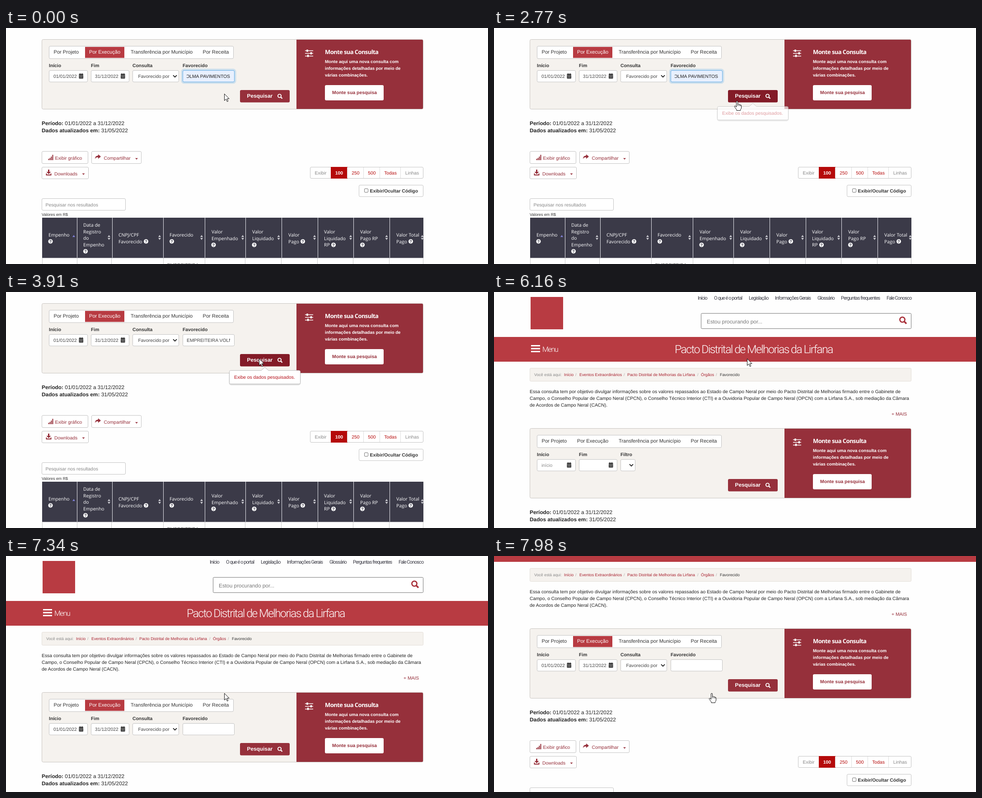
These frames come from a looping animation (1067 by 525 pixels, 8 s). An HTML page:

```html
<!DOCTYPE html>
<html lang="pt-BR">
<head>
<meta charset="utf-8">
<title>Consulta</title>
<style>
html, body { margin: 0; width: 100%; height: 100%; overflow: hidden; background: #fefefe; }
svg { display: block; width: 1067px; height: 525px; }
text { font-family: "Liberation Sans", Arial, sans-serif; white-space: pre; text-rendering: geometricPrecision; }
.b { font-weight: 700; }
.head { font-family: "Open Sans", sans-serif; }
.bold { font-family: "Open Sans", sans-serif; font-weight: 700; letter-spacing: -.6px; }
.nav { font-family: Roboto, sans-serif; letter-spacing: -.95px; }
.title { font-family: Roboto, sans-serif; font-weight: 300; letter-spacing: -1.7px; }
.menu { font-family: Roboto, sans-serif; font-weight: 300; letter-spacing: -1.3px; }
</style>
</head>
<body>
<svg id="stage" viewBox="0 0 1067 525"></svg>
<script>
const RED = '#96303b', BAND = '#b83b42', INK = '#333', GRAY = '#888', CREAM = '#f5f2ee', DARK = '#3b3a48';
const BASE = 10.37;

const text = (x, y, s, fill = INK, size = BASE, cls = '', more = '') =>
  `<text x="${x}" y="${y}" fill="${fill}" font-size="${size}" class="${cls}" ${more}>${s}</text>`;
const rect = (x, y, w, h, fill, stroke = 'none', r = 0, more = '') =>
  `<rect x="${x}" y="${y}" width="${w}" height="${h}" fill="${fill}" stroke="${stroke}" rx="${r}" ${more}/>`;
const box = (x, y, w, h) => rect(x + .5, y + .5, w - 1, h - 1, '#fff', '#c4c4c4', 2.5);
const path = (d, fill, stroke = 'none', width = 1) =>
  `<path d="${d}" fill="${fill}" stroke="${stroke}" stroke-width="${width}"/>`;
const group = (id, s) => `<g id="${id}">${s}</g>`;

const lens = (x, y, color, k = 1) => `<g transform="translate(${x} ${y}) scale(${k})" fill="none" stroke="${color}">
  <circle cx="-1" cy="-1" r="3.7" stroke-width="1.8"/><path d="M2 2L5 5" stroke-width="2.4"/></g>`;
const calendar = x => rect(x, 380, 9.5, 10.5, '#222', 'none', 1) +
  path(`M${x} 382.8h9.5M${x + 1} 385.5h7.5M${x + 1} 388h7.5`, 'none', '#fff', .7) +
  path(`M${x + 2.5} 379v2.5m4.5-2.5v2.5`, 'none', '#222', 1.4);
const chevron = x => path(`M${x - 4} 383.2l4 4 4-4`, 'none', '#222', 1.9);
const caretDown = (x, y) => path(`M${x - 3} ${y}h6l-3 3.2z`, RED);

function header() {
  const nav = [[451, 'Início'], [487, 'O que é o portal'], [564, 'Legislação'], [622, 'Informações Gerais'],
    [716, 'Glossário'], [768, 'Perguntas frequentes'], [869, 'Fale Conosco']];
  const crumbs = [[89, 'Você está aqui:', GRAY], [155, 'Início', '#a8202e'], [180, '/', '#aaa'],
    [189, 'Eventos Extraordinários', '#a8202e'], [287, '/', '#aaa'],
    [295, 'Pacto Distrital de Melhorias da Lirfana', '#a8202e'], [450, '/', '#aaa'],
    [458, 'Órgãos', '#a8202e'], [491, '/', '#aaa'], [500, 'Favorecido', INK]];
  const intro = [
    'Essa consulta tem por objetivo divulgar informações sobre os valores repassados ao Estado de Campo Neral por meio do Pacto Distrital de Melhorias firmado entre o Gabinete de',
    'Campo, o Conselho Popular de Campo Neral (CPCN), o Conselho Técnico Interior (CTI) e a Ouvidoria Popular de Campo Neral (OPCN) com a Lirfana S.A., sob mediação da Câmara',
    'de Acordos de Campo Neral (CACN).'];
  return rect(81, 11, 72, 72, BAND) +
    nav.map(([x, s]) => text(x, 17, s, '#3a3a44', 11, 'nav')).join('') +
    rect(458.5, 47.5, 465, 34, '#fff', '#777', 2) +
    text(471, 69.5, 'Estou procurando por...', '#777', 11.85) + lens(905.5, 63, '#a8303a', 1.5) +
    rect(0, 100, 1067, 55, BAND) +
    path('M82 119.5h20m-20 6.5h20m-20 6.5h20', 'none', '#fff', 3) +
    text(107, 132.5, 'Menu', '#fff', 16, 'menu') +
    text(400, 136, 'Pacto Distrital de Melhorias da Lirfana', '#fff', 25, 'title') +
    rect(79.5, 169.5, 844, 29, CREAM, '#e3ded8', 2) +
    crumbs.map(([x, s, c]) => text(x, 187, s, c, 8.89)).join('') +
    intro.map((s, i) => text(79, 225 + 15 * i, s, '#222')).join('') +
    text(880, 275, '+ MAIS', RED);
}

function form() {
  const company = 'EMPREITEIRA VOLMA PAVIMENTOS';
  const label = (x, s) => text(x, 364.7, s, INK, BASE, 'b');
  const tab = (x, s) => text(x, 335.2, s, INK, 11.11);
  const empty = tab(184, 'Por Execução') + label(280, 'Filtro') +
    text(105, 389, 'início', GRAY) + box(280, 372, 33, 26.5) + chevron(304);
  const filled = rect(175, 320, 87, 24.5, BAND) + text(184, 335.2, 'Por Execução', '#fff', 11.11) +
    label(280, 'Consulta') + label(391, 'Favorecido') +
    text(105, 389, '01/01/2022', '#444') + text(197, 389, '31/12/2022', '#444') +
    box(280, 372, 103, 26.5) + text(292.5, 389, 'Favorecido por', '#444') + chevron(374) +
    box(391, 372, 115, 26.5);
  const focus = rect(390, 371, 117, 28.5, 'none', '#66afe9', 4, 'stroke-width="5" opacity=".28"') +
    rect(391.5, 372.5, 114, 25.5, '#e8f0fe', '#66afe9', 2.5) +
    text(496, 389, company, '#222', BASE, '', 'text-anchor="end" clip-path="url(#field)"') +
    group('caret', rect(494, 380, 1, 11, '#111'));
  return rect(79.5, 303.5, 844, 155, CREAM, '#c9c5c1', 3) +
    path('M643 304h278q2 0 2 2v150q0 2-2 2h-278z', RED) +
    box(95, 318, 409, 28.5) + tab(105.5, 'Por Projeto') + tab(276, 'Transferência por Município') + tab(435.5, 'Por Receita') +
    label(95, 'Início') + label(188, 'Fim') + box(95, 372, 86, 26.5) + box(188, 372, 85, 26.5) +
    calendar(161.5) + calendar(254) +
    group('empty', empty) + group('filled', filled) +
    group('typed', text(400, 389, company, '#444', BASE, '', 'clip-path="url(#field)"')) + group('focus', focus) +
    rect(518, 416, 110, 27.5, RED, 'none', 3, 'id="button"') +
    text(533.5, 433.3, 'Pesquisar', '#fff', 11.85, 'b') + lens(606.5, 430, '#fff') +
    path('M662 328.5h18m-18 6h18m-18 6h18', 'none', '#fff', 1.7) +
    path('M667 326v5m8.5 .8v5m-7 .8v5', 'none', '#fff', 3.4) +
    text(706, 335.7, 'Monte sua Consulta', '#fff', 13, 'bold') +
    ['Monte aqui uma nova consulta com', 'informações detalhadas por meio de', 'várias combinações.']
      .map((s, i) => text(706, 356.3 + 15 * i, s, '#fff', 9.63, 'b')).join('') +
    rect(706, 405, 130, 34, '#fff', 'none', 3) + text(722, 425.2, 'Monte sua pesquisa', RED, BASE, 'b');
}

function results() {
  const pair = (y, a, b) => `<text x="79" y="${y}" font-size="11.85" fill="#222"><tspan class="b">${a}</tspan> ${b}</text>`;
  const pager = [[674, 45, 'Exibir', GRAY], [719, 37, '100', '#fff'], [756, 36, '250', '#b50a0a'],
    [792, 36, '500', '#b50a0a'], [828, 46, 'Todas', '#b50a0a'], [874, 50, 'Linhas', GRAY]];
  return pair(493.5, 'Período:', '01/01/2022 a 31/12/2022') + pair(510.3, 'Dados atualizados em:', '31/05/2022') +
    box(79, 552, 103, 28) + path('M94.5 572v-3m3 3v-5m3 5v-8m3 8v-12', 'none', RED, 2) + text(108.5, 570.7, 'Exibir gráfico', RED) +
    box(189, 552, 111, 28) + path('M197 570c0-6 3-8 7-8v-3l6 5-6 5v-3.5c-4 0-6 1-7 4.5z', RED) +
    text(216.5, 570.7, 'Compartilhar', RED) + caretDown(289, 567.5) +
    box(79, 587, 104, 27) + path('M93 593h3v5h3.5l-5 5-5-5h3.5zM88.5 601.5h2v2.5h8v-2.5h2v4.5h-12z', RED) +
    text(107, 605.7, 'Downloads', RED) + caretDown(171.5, 601.5) +
    box(673, 587, 251, 26) +
    pager.map(([x, w, s, c], i) => (i > 1 ? path(`M${x - .5} 588v24`, 'none', '#ddd') : '') +
      (i == 1 ? rect(x, 587, w, 26, '#b50a0a') : '') +
      text(x + w / 2, 603.8, s, c, BASE, i == 1 ? 'b' : '', 'text-anchor="middle"')).join('') +
    box(781, 627, 143, 26.5) + rect(793.5, 635.5, 8, 8, '#fff', '#777', 1.5) +
    text(805.5, 644, 'Exibir/Ocultar Código', INK, BASE, 'b') +
    box(79, 657, 186, 27) + text(87.5, 674.5, 'Pesquisar nos resultados', GRAY) +
    text(79, 696.3, 'Valores em R$', INK, 8.89);
}

function table() {
  // x, vertical centre of the first line, lines, help icon offset, sort arrow x
  const cols = [
    [94, 738, ['Empenho', ''], 4.5, 150], [171, 716, ['Data de', 'Registro', 'do', 'Empenho', ''], 5, 228],
    [249, 738, ['CNPJ/CPF', 'Favorecido'], 61, 340], [362, 738, ['Favorecido', ''], 5, 433],
    [455, 731, ['Valor', 'Empenhado', ''], 4.5, 524], [545, 731, ['Valor', 'Liquidado', ''], 4.5, 603.5],
    [625, 738, ['Valor', 'Pago'], 32, 683], [704, 731, ['Valor', 'Liquidado', 'RP'], 21, 763],
    [784, 731, ['Valor', 'Pago RP', ''], 5, 842.5], [864, 738, ['Valor Total', 'Pago'], 32, 921.5]];
  const edges = [157.5, 235.5, 348.5, 440.5, 530.5, 610.5, 690.5, 769.5, 849.5];
  return rect(80, 700, 844, 89.5, DARK) +
    edges.map((x, i) => path(`M${x} 700v89`, 'none', '#e8e8ee') +
      path(`M${x - (i == 1 ? 2 : i > 3 ? 1 : 0)} 790v20`, 'none', '#ccc')).join('') +
    path('M80.5 790v20m843-20v20', 'none', '#ccc') +
    cols.map(([x, y, lines, dx, sx], i) => {
      const end = y + 14.7 * (lines.length - 1);
      return lines.map((s, n) => text(x, y + 3.8 + 14.7 * n, s, '#fff', BASE, 'head')).join('') +
        `<circle cx="${x + dx}" cy="${end}" r="5" fill="#fff"/>` +
        text(x + dx, end + 3.2, '?', DARK, 9, 'b', 'text-anchor="middle"') +
        (i ? path(`M${sx - 3} 743l3-4.5 3 4.5zm0 2h6l-3 4.5z`, '#c9c9cf')
           : path(`M${sx - 3} 743l3-4.5 3 4.5z`, '#7f7fd5'));
    }).join('') +
    text(356.5, 809, 'EMPREITEIRA', '#444');
}

const tooltip = rect(493.5, 454, 159, 31.5, '#000', 'none', 5, 'opacity=".12"') +
  path('M497.5 452.5h67.5l8-7 8 7h67.5q3 0 3 3v24q0 3-3 3h-151q-3 0-3-3v-24q0-3 3-3z', '#fff', '#bbb') +
  group('hint', text(505, 470.7, 'Exibe os dados pesquisados.', '#b5121b'));
const arrow = path('M.5 .5V15.5L4 12.2 6.6 17.8 8.8 16.8 6.3 11.3H11z', '#fff', '#111');
const hand = path('M-1.5 14V2Q-1.5 .5 0 .5T1.5 2V7.5Q4 6.5 4.7 8.2 7 7.5 7.4 9.2 9.6 8.9 9.6 11V15Q9.6 18 7.5 19.5V21.5H-1V19.5L-5.5 13.5Q-6.5 11.5-4.5 11.3-3.2 11.3-1.5 14zM1.5 7.5v4M4.7 8.5v3M7.4 9.5v2.5', '#fff', '#111');

const $ = id => document.getElementById(id);
const show = (id, on) => $(id).setAttribute('visibility', on ? 'inherit' : 'hidden');
const at = (steps, t) => steps.filter(s => s[0] <= t).pop();

$('stage').innerHTML =
  '<defs><clipPath id="field"><rect x="400" y="373" width="96" height="24"/></clipPath></defs>' +
  group('page', header() + form() + results() + table() + group('tooltip', tooltip)) +
  group('pointer', group('arrow', arrow) + group('hand', hand));

const pointer = [ // time, x, y, hand
  [0, 483, 146, 0], [2500, 492, 150, 0], [2620, 516, 160, 0], [2770, 538, 162, 1], [2920, 553, 153, 1],
  [3040, 558, 151, 1], [3190, 561, 147, 1], [3910, 560, 148, 0], [6980, 556, 163, 0], [7100, 529, 215, 0],
  [7220, 497, 283, 0], [7340, 483, 305, 0], [7860, 484, 305, 1], [7980, 482, 305, 1]];
const scrolls = [[0, 278], [6160, 0], [7860, 60], [7980, 142]];
const fades = [[0, 0], [2770, .45], [2920, .8], [3040, 1], [6160, 0]];
const blinks = [280, 680, 1260, 1760, 2350, 2770, 3360];
const start = performance.now();

function frame() {
  const t = (performance.now() - start) % 8000;
  const [, x, y, isHand] = at(pointer, t);
  const fade = at(fades, t)[1];
  const filled = t < 6160 || t >= 6980;
  $('page').setAttribute('transform', `translate(0 ${-at(scrolls, t)[1]})`);
  $('pointer').setAttribute('transform', `translate(${x} ${y})`);
  show('arrow', !isHand);
  show('hand', isHand);
  show('filled', filled);
  show('empty', !filled);
  show('focus', t < 3790);
  show('typed', t >= 3790 && t < 6160);
  show('caret', t < 3790 && blinks.filter(b => b <= t).length % 2);
  $('tooltip').setAttribute('opacity', fade && .4 + .6 * fade);
  $('hint').setAttribute('opacity', .3 + .7 * fade);
  $('button').setAttribute('fill', fade ? '#831b27' : RED);
  requestAnimationFrame(frame);
}
frame();
</script>
</body>
</html>
```
